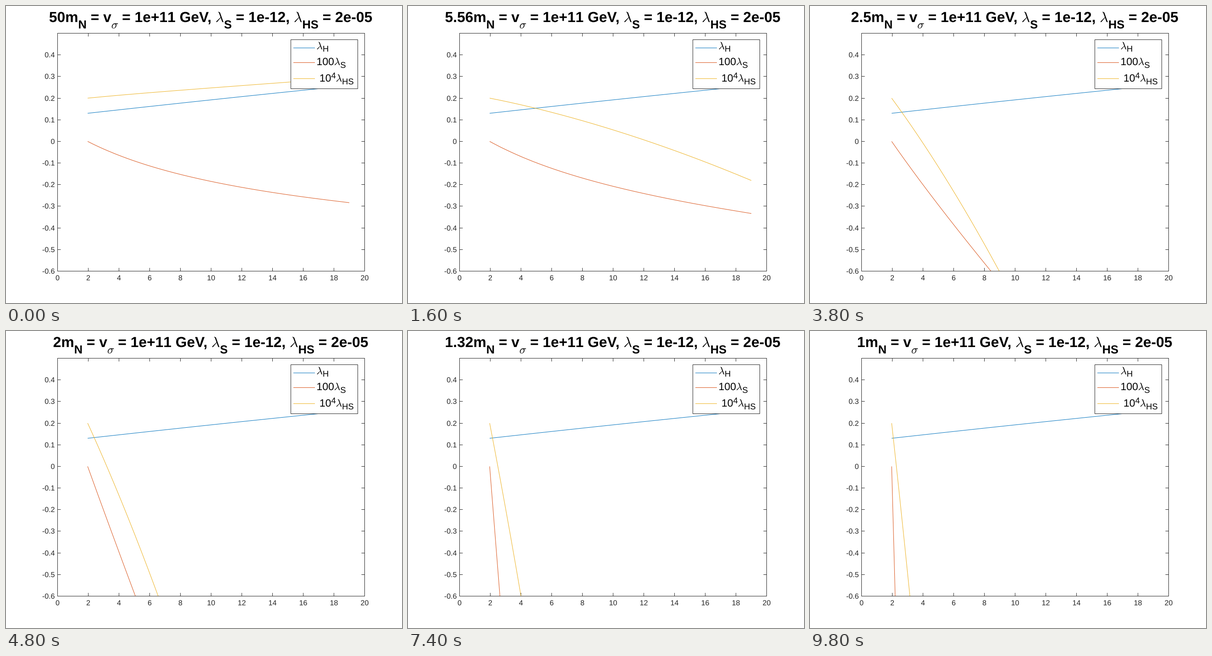
A matplotlib script that plays this animation: 864x648 px, repeating every 10000 ms.

```python
import numpy as np
import matplotlib.pyplot as plt
from matplotlib.animation import FuncAnimation
from matplotlib.patches import PathPatch, Rectangle
from matplotlib.path import Path
from matplotlib.textpath import TextPath
from matplotlib.transforms import Affine2D

plt.rcParams["mathtext.fontset"] = "cm"

W, H, DPI = 864, 648, 100
PT = 72 / DPI
FRAMES, STEP_MS = 50, 200
LEFT, RIGHT, TOP, BOTTOM = 112.5, 782.5, 59.5, 578.5
INK = "#262626"
BLUE, RED, YELLOW = "#0072BD", "#D95319", "#EDB120"
GREEK = {"λ": (r"$\lambda$", 0.583), "σ": (r"$\sigma$", 0.571)}

fig = plt.figure(figsize=(W / DPI, H / DPI), dpi=DPI, facecolor="white")
ax = fig.add_axes([0, 0, 1, 1])
ax.set_xlim(0, W)
ax.set_ylim(H, 0)
ax.axis("off")


def px(x):
    return LEFT + (RIGHT - LEFT) * np.asarray(x) / 20


def py(y):
    return TOP + (BOTTOM - TOP) * (0.5 - np.asarray(y)) / 1.1


# ---- text as outlines, laid out run by run ----
def glyphs(s, weight):
    return TextPath((0, 0), s, size=100,
                    prop={"family": "Liberation Sans", "weight": weight})


def advance(s, weight):
    def ink(t):
        return glyphs(t, weight).get_extents().width
    return (ink("|" + s + "|") - ink("||")) / 100


def layout(runs, size, weight="normal"):
    """runs: (text, scale, drop in px); returns the path and its width."""
    parts, x = [], 0
    for s, scale, drop in runs:
        em = size * scale
        if s in GREEK:
            math, adv = GREEK[s]
            path = TextPath((0, 0), math, size=100)
        else:
            path, adv = glyphs(s, weight), advance(s, weight)
        if s.strip():
            move = Affine2D().scale(em / 100, -em / 100).translate(x, drop)
            parts.append(path.transformed(move))
        x += adv * em
    return Path.make_compound_path(*parts), x


def place(runs, size, x, y, align=0.0, weight="normal"):
    path, width = layout(runs, size, weight)
    return path.transformed(Affine2D().translate(x - align * width, y))


def label(runs, size, x, y, align=0.0, color=INK, z=3):
    if isinstance(runs, str):
        runs = [(runs, 1, 0)]
    ax.add_patch(PathPatch(place(runs, size, x, y, align),
                           fc=color, lw=0, zorder=z))


# Strokes are given at pixel centres, so snapping stays off.
def line(xs, ys, color, z=2):
    return ax.plot(xs, ys, color=color, lw=PT, zorder=z, snap=False,
                   solid_capstyle="butt")[0]


def box(x0, y0, x1, y1, fill, z):
    ax.add_patch(Rectangle((x0, y0), x1 - x0, y1 - y0, fc=fill, ec=INK,
                           lw=PT, zorder=z, snap=False))


# ---- axes frame ----
box(LEFT, TOP, RIGHT, BOTTOM, "none", 3)
for v in range(0, 21, 2):
    x = px(v)
    line([x, x], [BOTTOM, BOTTOM - 7], INK)
    line([x, x], [TOP, TOP + 7], INK)
    label(str(v), 16, x, 598.5, 0.5)
for n in range(-6, 5):
    y = np.floor(py(n / 10)) + 0.5
    line([LEFT, LEFT + 7], [y, y], INK)
    line([RIGHT, RIGHT - 7], [y, y], INK)
    label(f"{n / 10:g}", 16, 106.5, y + 5.5, 1)

# ---- legend ----
box(621.5, 73.5, 767.5, 180.5, "white", 5)
SUB = 0.8
entries = [
    (BLUE, 91.5, 94.5, [("λ", 1, 0), ("H", SUB, 5)]),
    (RED, 123.5, 129, [("100", 1, 0), ("λ", 1, 0), ("S", SUB, 6)]),
    (YELLOW, 158.5, 165, [(" 10", 1, 0), ("4", SUB, -7), ("λ", 1, 0),
                          ("HS", SUB, 6)]),
]
for color, y, base, runs in entries:
    line([627, 674], [y, y], color, 6)
    label(runs, 23, 677.5, base, color="black", z=6)

# ---- running couplings; u is the distance from the starting scale ----
X0 = 1.96
u = np.linspace(0, 19 - X0, 200)
xs = px(X0 + u)
fall = np.polyfit(
    [0, 2.04, 4.04, 6.04, 8.04, 10.04, 12.04, 14.04, 16.04, 17.04],
    [0, .0646, .1134, .1525, .1854, .2125, .236, .2566, .275, .2833], 5)


def lam_h():
    return 0.13 + u * (0.0079 - 0.000022 * u)


def lam_s(k):
    return -np.polyval(fall, u) - 4.12e-7 * k**4 * u * (1 + 0.005 * u)


def lam_hs(k):
    rise = 0.2 + 0.0052 * u + 0.0062 * (1 - np.exp(-u / 3.5))
    slope = 2.6e-4 + u * (5.05e-6 + 2e-9 * k * k)
    return rise - (k * k - 1) * u * slope


clip = Rectangle((LEFT, TOP), RIGHT - LEFT, BOTTOM - TOP,
                 transform=ax.transData)
line(xs, py(lam_h()), BLUE)
red = line(xs, py(lam_s(1)), RED)
yellow = line(xs, py(lam_hs(1)), YELLOW)
for curve in (red, yellow):
    curve.set_clip_path(clip)

title = PathPatch(Path([(0, 0)]), fc="black", lw=0, zorder=4)
ax.add_patch(title)


def title_path(k):
    runs = [(f"{FRAMES / k:.3g}m", 1, 0), ("N", SUB, 14),
            (" = v", 1, 0), ("σ", SUB, 14),
            (" = 1e+1", 1, 0), ("1 GeV, ", 1, 0),
            ("λ", 1, 0), ("S", SUB, 14), (" = 1e-12, ", 1, 0),
            ("λ", 1, 0), ("HS", SUB, 14), (" = 2e-05", 1, 0)]
    return place(runs, 31.8, 446.6, 35, 0.5, "bold")


def update(i):
    k = i + 1
    red.set_ydata(py(lam_s(k)))
    yellow.set_ydata(py(lam_hs(k)))
    title.set_path(title_path(k))
    return red, yellow, title


anim = FuncAnimation(fig, update, frames=FRAMES, interval=STEP_MS,
                     repeat=True, repeat_delay=0)
plt.show()
```
